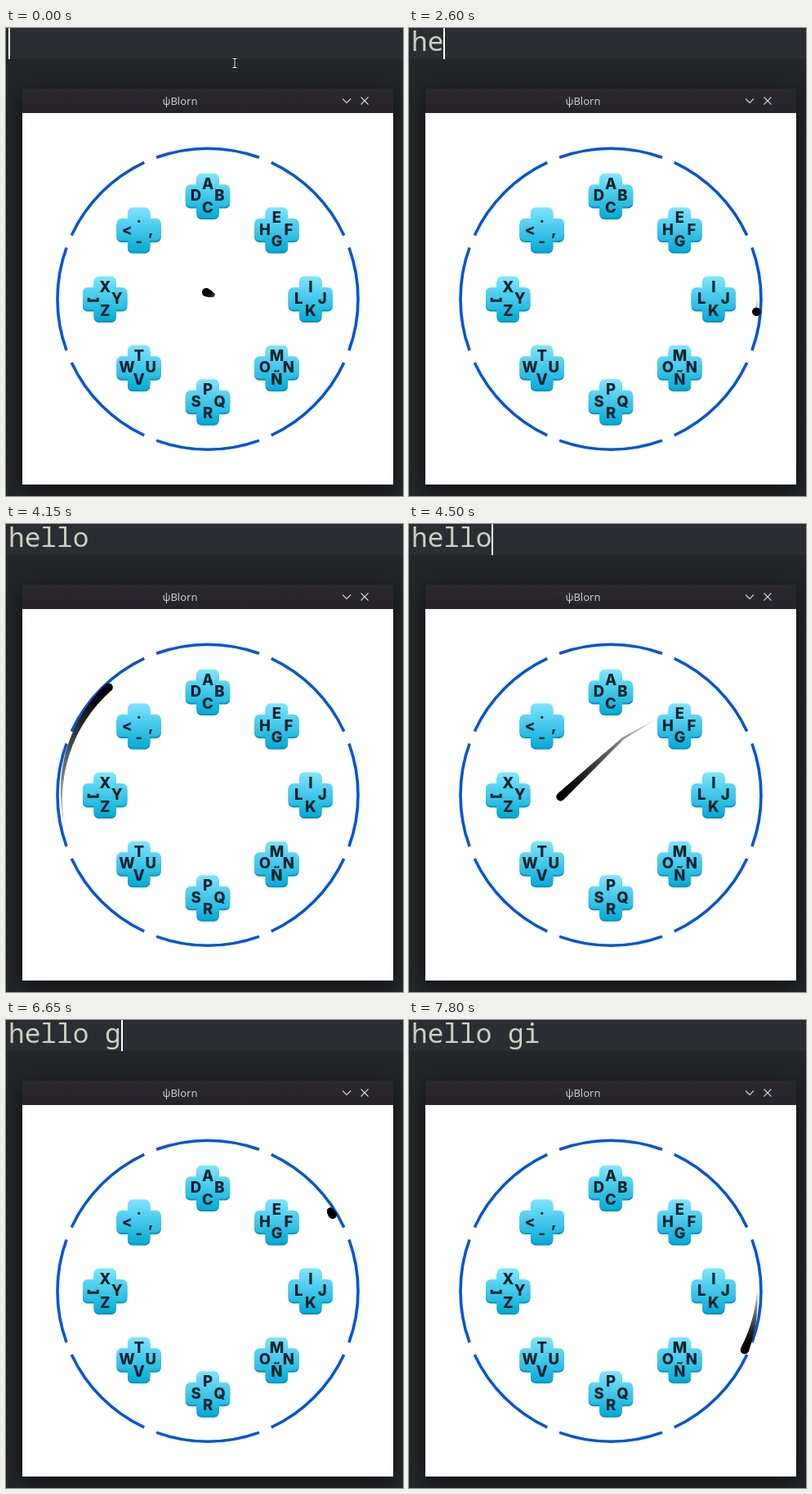
Animation, 486 px wide and 572 px high, one loop 8 s. Source, as an HTML page with a canvas:

```html
<!DOCTYPE html>
<html lang="en">
<head>
<meta charset="utf-8">
<title>Radial keyboard</title>
<style>
  html, body { margin: 0; width: 100%; height: 100%; overflow: hidden; background: #232629; }
  canvas { display: block; }
</style>
</head>
<body>
<canvas id="stage" width="486" height="572"></canvas>
<script>
const canvas = document.getElementById('stage');
const LOOP = 8000, STEP = 50, LAST_MOVE = 7800, TRAIL = 120, BLINK = 530;
const CX = 247, CY = 331.2, REACH = 179;
const home = [245, 328];
const groups = ['IJKL', 'MNÑO', 'PQRS', 'TUVW', 'XYZ ', '.,-<', 'ABCD', 'EFGH'];
const typed = 'hello gi';
const typeTimes = [1600, 2100, 2750, 2950, 3400, 5170, 6200, 7200];

// Pointer moves: start ms, end ms, then a point or an angle on the ring.
const moves = [
  [-60, 0, [245, 323]], [540, 600, [245, 332]],
  [960, 1050, -37], [1050, 1090, -43],
  [1880, 2130, -33], [2380, 2500, 5], [3130, 3280, 51],
  [3790, 4325, 313], [4325, 4410, [262, 262]], [4410, 4610, 150], [4610, 4740, home],
  [5690, 6130, -33], [6630, 7205, 13], [7205, 7420, -2], [7670, 7800, 23.7]
];

function polar(deg, r) {
  const a = deg * Math.PI / 180;
  return [CX + r * Math.cos(a), CY + r * Math.sin(a)];
}

const mix = (a, b, u) => a + (b - a) * u;
const toPoint = place => Array.isArray(place) ? place : polar(place, REACH);

// Ring to ring follows the arc; every other move is straight.
function pointerAt(t) {
  let place = [253, 326];
  for (const [start, end, target] of moves) {
    if (t <= start) break;
    const u = Math.min(1, (t - start) / (end - start));
    if (u === 1) place = target;
    else if (!Array.isArray(place) && !Array.isArray(target)) place = mix(place, target, u);
    else {
      const from = toPoint(place), to = toPoint(target);
      place = from.map((v, axis) => mix(v, to[axis], u));
    }
  }
  return toPoint(place);
}

function line(g, color, width, ...points) {
  g.strokeStyle = color;
  g.lineWidth = width;
  g.beginPath();
  points.forEach(p => g.lineTo(...p));
  g.stroke();
}

function gradient(g, top, bottom, from, to) {
  const fill = g.createLinearGradient(0, top, 0, bottom);
  fill.addColorStop(0, from);
  fill.addColorStop(1, to);
  return fill;
}

function cross(g, x, y, fill) {
  g.fillStyle = fill;
  g.beginPath();
  g.roundRect(x - 13.7, y - 27.2, 27.4, 54.4, 6);
  g.roundRect(x - 27.2, y - 13.7, 54.4, 27.4, 6);
  g.fill();
}

function drawKey(g, letters, x, y) {
  const ink = '#0a2229';
  cross(g, x, y + 2, '#0693bb');
  cross(g, x, y, gradient(g, y - 27, y + 27, '#80e5ff', '#06abd7'));
  g.font = '800 18.5px Inter, sans-serif';
  [...letters].forEach((letter, i) => {
    const [dx, dy] = [[0, -14.5], [14.5, 0], [0, 14.5], [-14.5, 0]][i];
    g.fillStyle = ink;
    if (letter !== ' ') g.fillText(letter, x + dx, y + dy + 6.3);
    else line(g, ink, 3, [x - 20, y - 1], [x - 20, y + 2.5], [x - 9, y + 2.5], [x - 9, y - 1]);
  });
}

function drawWindow(g) {
  g.shadowColor = 'rgba(0,0,0,.65)';
  g.shadowBlur = 26;
  g.shadowOffsetY = 6;
  g.fillStyle = gradient(g, 74, 104, '#2b2a30', '#262329');
  g.beginPath();
  g.roundRect(20, 74, 454, 484, [4, 4, 0, 0]);
  g.fill();
  g.shadowColor = 'transparent';
  g.fillStyle = '#fff';
  g.fillRect(20, 104, 454, 454);
  g.fillStyle = '#3a2f3a';
  g.fillRect(20, 103, 454, 1);

  g.textAlign = 'center';
  g.fillStyle = '#c9cacb';
  g.font = '13px "Noto Sans", sans-serif';
  g.fillText('ψBlorn', 213, 94);
  const icon = (...points) => line(g, '#d3d4d5', 1.1, ...points);
  icon([412, 86.5], [417, 91.5], [422, 86.5]);
  icon([434.5, 84.5], [443.5, 93.5]);
  icon([443.5, 84.5], [434.5, 93.5]);
}

function drawBackdrop() {
  const layer = document.createElement('canvas');
  layer.width = canvas.width;
  layer.height = canvas.height;
  const g = layer.getContext('2d');
  g.fillStyle = '#232629';
  g.fillRect(0, 0, 486, 572);
  g.fillStyle = '#2a2e32';
  g.fillRect(1, 0, 485, 38);
  drawWindow(g);

  groups.forEach((letters, i) => {
    const angle = i * Math.PI / 4, half = Math.PI / 9;
    g.strokeStyle = '#0055d4';
    g.lineWidth = 3.6;
    g.beginPath();
    g.arc(CX, CY, 184, angle - half, angle + half);
    g.stroke();
    const [x, y] = polar(i * 45, i % 2 ? 119.3 : 125.8);
    drawKey(g, letters, x, y - 0.5);
  });
  return layer;
}

function drawIBeam(g) {
  for (const [color, width] of [['#111', 3], ['#fff', 1]]) {
    line(g, color, width, [280, 38], [280, 48]);
    for (const y of [37.5, 48.5]) line(g, color, width, [277.5, y], [282.5, y]);
  }
}

function drawEditor(g, t) {
  const count = typeTimes.filter(time => time <= t).length;
  g.fillStyle = '#cfcfc2';
  g.font = '32.8px "Noto Sans Mono", monospace';
  g.fillText(typed.slice(0, count), 3, 27.5);
  const since = t - (count ? typeTimes[count - 1] : 20);
  if (since < 0 || Math.floor(since / BLINK) % 2 === 0) {
    g.fillStyle = '#fcfcfc';
    g.fillRect(Math.floor(3.4 + 19.7 * count), 0, 2, 38);
  }
}

function drawPointer(g, t) {
  const parts = 40;
  g.lineCap = 'round';
  for (let i = parts; i > 0; i--) {
    const age = i / parts, shade = 215 * age ** 1.4;
    line(g, `rgb(${shade},${shade},${shade})`, 10 * (1 - age) + 0.3,
      pointerAt(t - TRAIL * age), pointerAt(t - TRAIL * (i - 1) / parts));
  }
  g.lineCap = 'butt';
  g.fillStyle = '#000';
  g.beginPath();
  g.arc(...pointerAt(t), 5, 0, 7);
  g.fill();
}

const stage = canvas.getContext('2d');
const backdrop = drawBackdrop();
const start = performance.now();

function render(now) {
  const elapsed = Math.max(0, now - start) % LOOP;
  const t = Math.min(LAST_MOVE, Math.floor(elapsed / STEP) * STEP);
  stage.drawImage(backdrop, 0, 0);
  drawEditor(stage, t);
  if (t < 1500) drawIBeam(stage);
  drawPointer(stage, t);
  requestAnimationFrame(render);
}
render(start);
</script>
</body>
</html>
```
